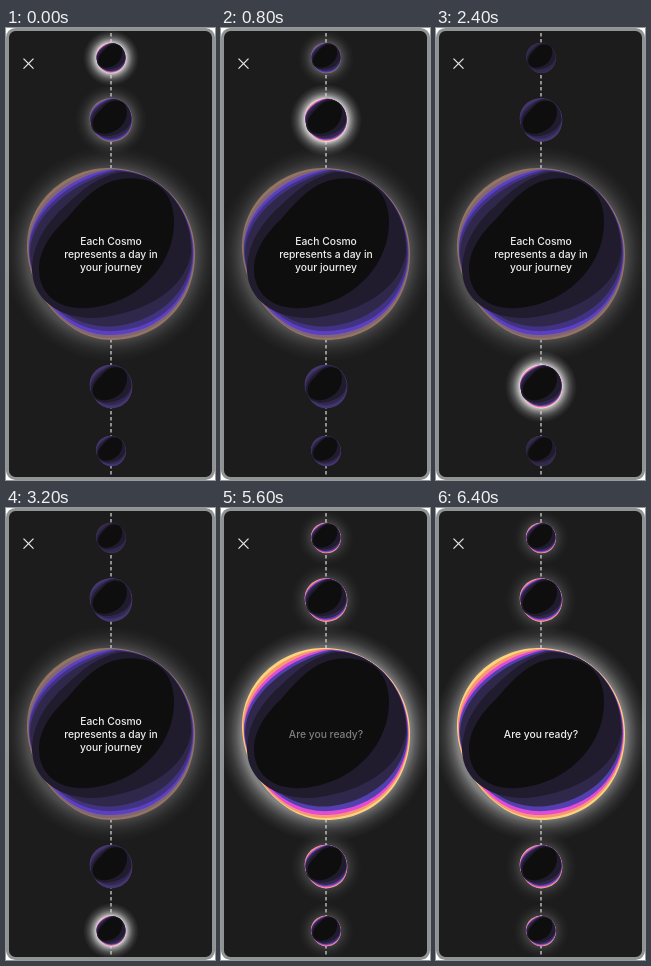
An HTML page for the animation above (7200 ms loop, 209 by 452 pixels).

```html
<!DOCTYPE html>
<html lang="en">
<head>
<meta charset="utf-8">
<title>Cosmo journey</title>
<style>
  html, body { margin: 0; width: 100%; height: 100%; overflow: hidden; background: #fff; }
  svg { display: block; width: 100%; height: 100%; }
  text { font: 500 10.3px Inter, "Open Sans", sans-serif; fill: #eee; text-anchor: middle; }
  .halo { opacity: var(--glow); }
  .rim { fill: var(--rim); }
  .hot { fill: var(--hot); }
  .pink { fill: var(--pink); }
  .violet { fill: var(--violet); }
  .intro { animation: intro 7.2s step-end infinite; }
  .ready { animation: ready 7.2s step-end infinite; }
  @keyframes intro { 0% { opacity: 1; } 55.5556%, 100% { opacity: 0; } }
  @keyframes ready {
    0% { opacity: 0; }
    55.5556%, 77.7778% { opacity: .5; }
    66.6667%, 88.8889%, 100% { opacity: 1; }
  }
</style>
</head>
<body>
<svg viewBox="0 0 209 452" preserveAspectRatio="none">
  <defs>
    <g id="orb">
      <path class="rim" d="M-4-86C46-87 84-48 84 0C84 48 50 86 0 86C-46 86-84 36-84-8C-84-52-46-85-4-86Z"/>
      <path class="hot" d="M-3-85C47-86 83-47 83 0C83 46 50 83 0 84C-46 85-83 36-83-8C-83-48-44-82-3-85Z"/>
      <path class="pink" d="M0-84.5C48-85 82.5-46 82.5 0C82 44 50 79 2 81C-46 83-82 36-82-6C-82-46-40-79 0-84.5Z"/>
      <path class="violet" d="M3-84C50-84 82-45 82 0C81 42 50 74 4 77C-44 80-82 36-82-5C-81-43-38-76 3-84Z"/>
      <path fill="#30284a" d="M5-83C50-83 82-44 81 0C80 38 46 67 6 72C-42 78-81 36-81-3C-79-40-36-73 5-83Z"/>
      <path fill="#201b2d" d="M10-82C50-82 82-44 80-2C76 30 44 54 0 62C-40 70-78 52-79 16C-78-12-64-31-48-46C-32-61-16-77 10-82Z"/>
      <path fill="#0e0e0f" d="M10-75C40-79 63-66 63-32C63 10 30 44-10 52C-45 60-71 46-72 16C-72-6-58-22-44-36C-28-54-14-71 10-75Z"/>
    </g>
  </defs>
  <rect x="1.5" y="1.5" width="206" height="449" rx="8" fill="#1c1c1c" stroke="#8f9393" stroke-width="3"/>
  <g id="halos"></g>
  <path d="M105 5V447" stroke="#dcdcdc" stroke-width="1.2" stroke-dasharray="3.5 2.5"/>
  <g id="orbs"></g>
  <path d="M17.5 30.6l10 10m0-10l-10 10" stroke="#e6e6e6" stroke-width="1.3"/>
  <g class="intro">
    <text x="105" y="217">Each Cosmo</text>
    <text x="105" y="229.8">represents a day in</text>
    <text x="105" y="242.6">your journey</text>
  </g>
  <text class="ready" x="105" y="229.8">Are you ready?</text>
</svg>
<script>
  // glow, rim, hot, pink, violet
  const looks = {
    off:  [0, '#40344c', '#3a2f4c', '#352b4f', '#322950'],
    dim:  [0, '#4d3d5c', '#463768', '#453480', '#3c2f6c'],
    half: [.25, '#957460', '#806577', '#5b3fc4', '#413282'],
    calm: [.17, '#f3b585', '#ee7f96', '#c94bcf', '#5140ae'],
    full: [.5, '#fcd47a', '#f89873', '#e24bd6', '#5140ae'],
    peak: [.85, '#ffe2c8', '#f7a09c', '#d55fc6', '#4b3a94']
  };
  const names = ['glow', 'rim', 'hot', 'pink', 'violet'];
  const orbs = [
    { y: 30, r: 15, reach: 28, steps: 'peak half off off off calm calm calm calm' },
    { y: 92, r: 21.3, reach: 36, steps: 'half peak off dim dim calm calm calm calm' },
    { y: 226, r: 84, reach: 108, steps: 'half half full half half full full full full' },
    { y: 358.5, r: 21.3, reach: 36, steps: 'dim dim off peak dim calm calm calm calm' },
    { y: 423, r: 15, reach: 28, steps: 'dim dim off off peak calm calm calm calm' }
  ];
  const falloff = [[0, .9], [.25, .53], [.5, .26], [.75, .1], [1, 0]];

  const declare = look => looks[look].map((v, i) => `--${names[i]}:${v}`).join(';');
  let css = '', halos = '', bodies = '';
  orbs.forEach(({ y, r, reach, steps }, n) => {
    const states = steps.split(' ');
    const frames = states.map((s, i) => `${i / states.length * 100}%{${declare(s)}}`).join('');
    css += `@keyframes orb${n}{${frames}100%{${declare(states[0])}}}
      .orb${n}{animation:orb${n} 7.2s step-end infinite}`;
    const stops = falloff.map(([t, a]) =>
      `<stop offset="${(r + t * (reach - r)) / reach}" stop-color="#fff" stop-opacity="${a}"/>`).join('');
    halos += `<radialGradient id="halo${n}">${stops}</radialGradient>
      <g class="orb${n}"><circle class="halo" cx="105" cy="${y}" r="${reach}" fill="url(#halo${n})"/></g>`;
    bodies += `<g class="orb${n}"><use href="#orb" transform="translate(105 ${y}) scale(${r / 84})"/></g>`;
  });
  document.getElementById('halos').innerHTML = halos;
  document.getElementById('orbs').innerHTML = bodies;
  document.head.appendChild(document.createElement('style')).textContent = css;
</script>
</body>
</html>
```
